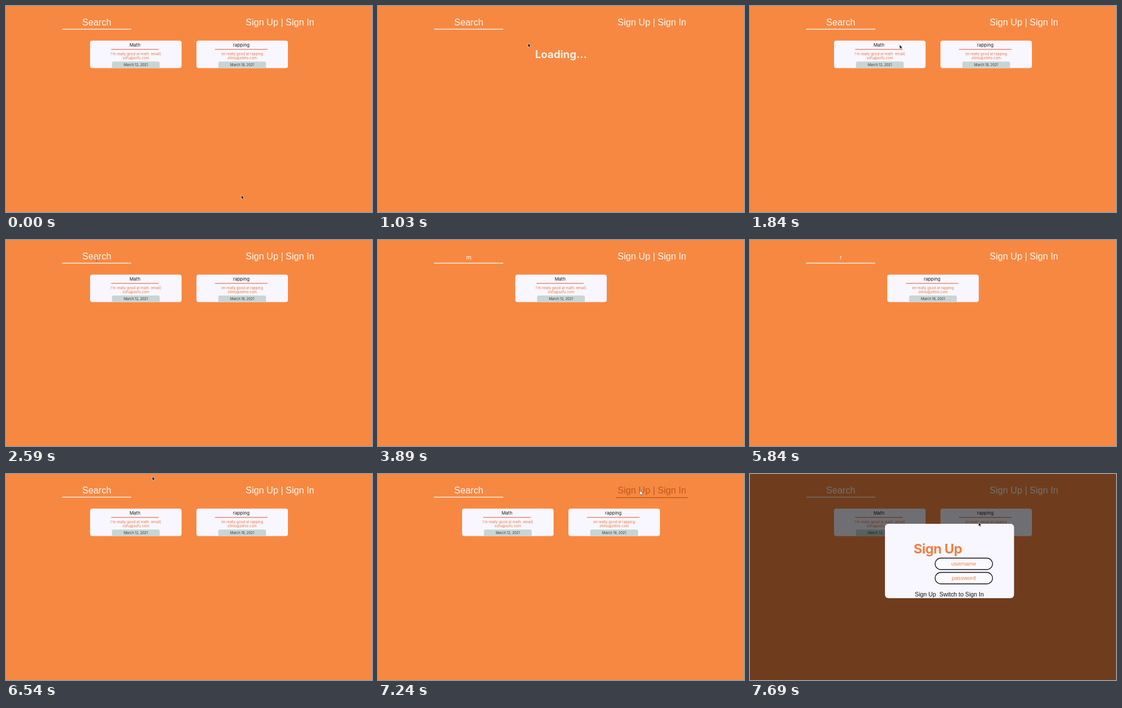
An HTML page that plays this animation: 640 px wide and 360 px high, repeating every 7990 ms.

```html
<!DOCTYPE html>
<html lang="en">
<head>
<meta charset="utf-8">
<title>Tutor search</title>
<style>
  html, body { margin: 0; width: 100%; height: 100%; overflow: hidden; background: #f78842; }
  svg { display: block; width: 640px; height: 360px; }
  text { text-anchor: middle; font-family: Inter, "Open Sans", sans-serif; }
  .ui { font-family: "Liberation Sans", Arial, sans-serif; }
  .nav { font-size: 16px; fill: #fffaf6; }
  .title { font-size: 8px; fill: #1d1d22; }
  .note { font-size: 6.2px; fill: #e8793c; }
  .date { font-size: 5.9px; fill: #2f3b3c; }
  .field { fill: #fbfaff; stroke: #1a1a1a; stroke-width: 1.3; }
  .hint { font-size: 9.8px; fill: #ee8144; }
  .button { font-size: 10.4px; fill: #111; text-anchor: start; }
</style>
</head>
<body>
<svg viewBox="0 0 640 360">
  <rect width="640" height="360" fill="#f78842"/>
  <text id="query" class="ui" x="158.7" y="34"></text>
  <rect x="98" y="39.8" width="121" height="1.4" fill="#fff4ec"/>
  <text id="account" class="ui nav" x="479" y="34">Sign Up | Sign In</text>
  <rect id="accountLine" x="416" y="40.6" width="125.5" height="1.4" fill="#c2571b"/>
  <g id="cards"></g>
  <text id="loading" x="320" y="91.3" font-size="18.4" font-weight="700" fill="#fdf0e6">Loading...</text>
  <g id="modal">
    <rect width="640" height="360" fill="#000" opacity=".55"/>
    <rect x="236" y="87" width="225.7" height="130" rx="6" fill="#f8f6ff"/>
    <text x="328.4" y="139.3" font-size="23.4" font-weight="700" letter-spacing="-.5" fill="#ee8144">Sign Up</text>
    <rect class="field" x="323.7" y="147" width="100.4" height="20" rx="10"/>
    <text class="ui hint" x="373.7" y="160.2">username</text>
    <rect class="field" x="323.7" y="172" width="100.4" height="20" rx="10"/>
    <text class="ui hint" x="373.7" y="185.2">password</text>
    <text class="ui button" x="288.3" y="214">Sign Up</text>
    <text class="ui button" x="331.3" y="214">Switch to Sign In</text>
  </g>
  <g id="cursor">
    <path id="arrow" d="M0 0V7.2L1.7 5.7L2.8 8.2L4.1 7.6L3 5.2H5.2Z" fill="#111" stroke="#fff" stroke-width=".6"/>
    <path id="beam" d="M-1.8 .5Q0 .5 0 2V8Q0 9.5 -1.8 9.5M1.8 .5Q0 .5 0 2M0 8Q0 9.5 1.8 9.5" fill="none" stroke="#8d7a70" stroke-width=".9"/>
    <path id="hand" d="M0 .8Q.8 0 1.5 .8V3.3L4.4 4.1Q5 4.4 4.9 5.2L4.2 8.8H.8L-1.4 5.4Q-1.1 4.4 0 5.2Z" fill="#fff" stroke="#333" stroke-width=".6"/>
  </g>
</svg>
<script>
const LOOP = 7990, STEP = 50;
const el = id => document.getElementById(id);
const show = (node, on) => node.setAttribute("display", on ? "inline" : "none");

const posts = [
  { title: "Math", rule: 83, note: "I'm really good at math. email|", mail: "sofu@sofu.com", date: "March 12, 2021" },
  { title: "rapping", rule: 92, note: "im really good at rapping", mail: "zilmo@zilmo.com", date: "March 18, 2021" }
];

// Each card is drawn around its own horizontal centre.
const cardMarkup = p => `<g>
  <rect x="-80" y="60.5" width="160" height="48" rx="4" fill="#f8f6ff"/>
  <text class="title" x="-1.6" y="71">${p.title}</text>
  <rect x="${-1.6 - p.rule / 2}" y="75.2" width="${p.rule}" height="1.2" fill="#dc7550"/>
  <text class="note" y="85.6">${p.note}</text>
  <text class="note" y="93">${p.mail}</text>
  <path d="M-41.7 108.5V100Q-41.7 97 -38.7 97H38.7Q41.7 97 41.7 100V108.5Z" fill="#c8d5d4"/>
  <text class="date" y="105.2">${p.date}</text></g>`;
el("cards").innerHTML = posts.map(cardMarkup).join("");
const cards = [...el("cards").children];

// Pointer moves: start time, number of steps, then a quadratic curve.
const moves = [
  { start: 30, steps: 4, path: [[411.5, 330.5], [330, 190], [262.3, 65]] },
  { start: 1840, steps: 16, path: [[262.3, 65], [230, 205], [158.5, 28.5]] },
  { start: 6290, steps: 16, path: [[158.5, 28.5], [320, -28], [457.8, 27.3]] },
  { start: 7490, steps: 5, path: [[457.8, 27.3], [430, 45], [399.7, 84.3]] }
];

function pointerAt(t) {
  const move = moves.filter(m => t >= m.start).pop() || moves[0];
  const count = Math.floor((t - move.start) / STEP) + 1;
  const raw = Math.min(1, Math.max(0, count / move.steps));
  const k = (1 - Math.cos(Math.PI * raw)) / 2;
  const [a, b, c] = move.path;
  return [0, 1].map(i => (1 - k) ** 2 * a[i] + 2 * k * (1 - k) * b[i] + k * k * c[i]);
}

const between = (t, from, to) => t >= from && t < to;

function render(t) {
  const typed = between(t, 3090, 4140) ? "m" : between(t, 5140, 5940) ? "r" : "";
  const loading = between(t, 1030, 1130);
  const modal = t >= 7340;

  const query = el("query");
  query.textContent = typed || "Search";
  query.setAttribute("font-size", typed ? 10.8 : 16);
  query.setAttribute("fill", "#fffaf6");

  cards.forEach((card, i) => {
    const hit = !typed || posts[i].title.toLowerCase().startsWith(typed);
    show(card, hit && !loading);
    card.setAttribute("transform", `translate(${typed ? 320 : 227 + 186 * i} 0)`);
  });
  show(el("loading"), loading);
  show(el("modal"), modal);

  const [x, y] = pointerAt(t);
  const inBar = y > 14 && y < 42 && !modal;
  const overSearch = inBar && x > 98 && x < 219;
  const overAccount = inBar && x > 416 && x < 542;
  el("account").style.fill = overAccount ? "#c2571b" : "";
  show(el("accountLine"), overAccount);

  el("cursor").setAttribute("transform", `translate(${x} ${y})`);
  show(el("cursor"), !between(t, 3090, 6290));
  show(el("beam"), overSearch);
  show(el("hand"), overAccount);
  show(el("arrow"), !overSearch && !overAccount);
}

const begin = performance.now();
function tick() {
  render((performance.now() - begin) % LOOP);
  requestAnimationFrame(tick);
}
tick();
</script>
</body>
</html>
```
